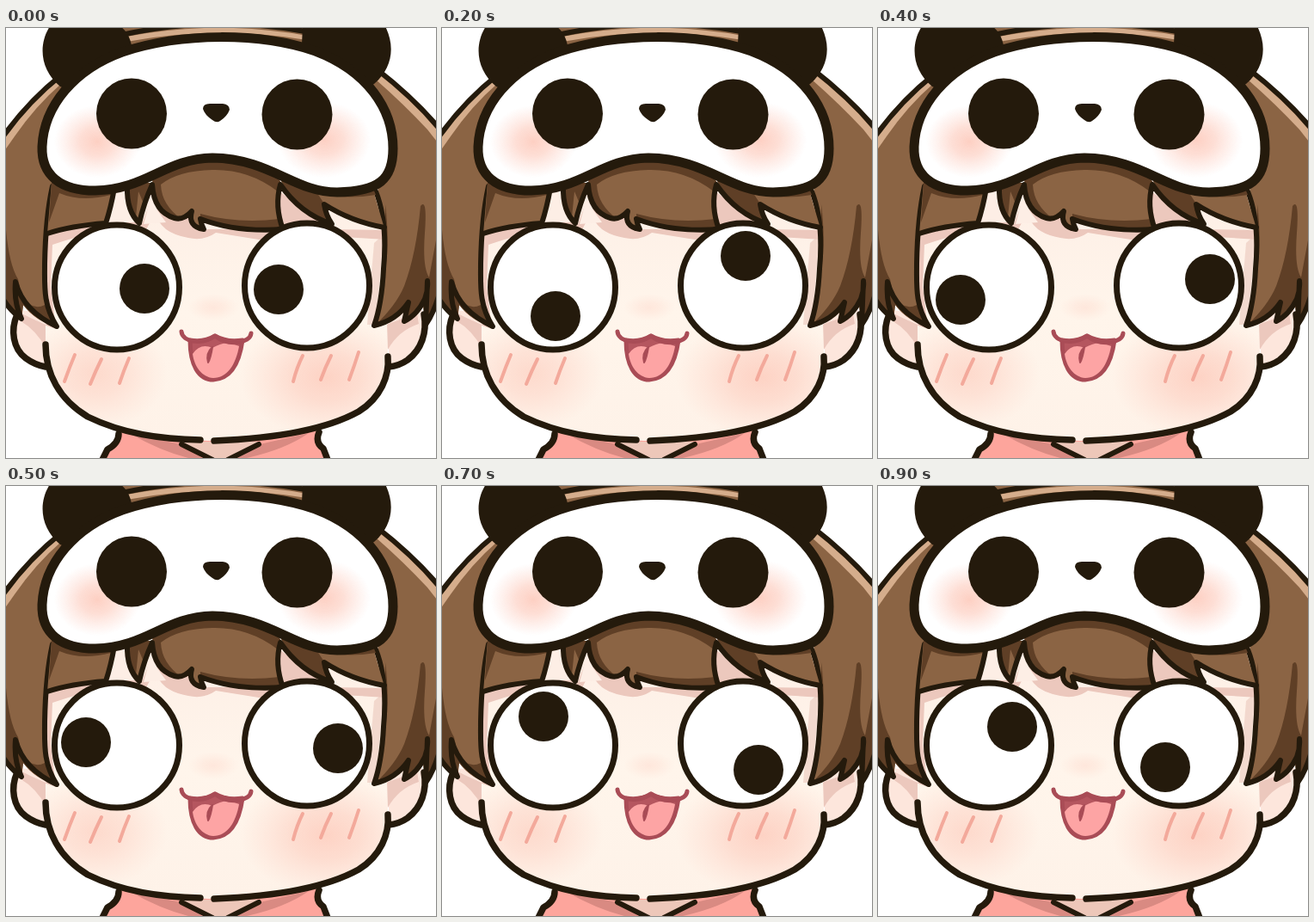
An HTML page for the animation above (1 s loop, 500x500 px).

```html
<!DOCTYPE html>
<html lang="en">
<head>
<meta charset="utf-8">
<title>Rolling eyes</title>
<style>
  html, body { margin: 0; width: 100%; height: 100%; overflow: hidden; background: #fff; }
  svg { display: block; width: 100vw; height: 100vh; }
  .ink { fill: none; stroke: #241a0c; stroke-width: 6; stroke-linecap: round; stroke-linejoin: round; }
  .bold { stroke-width: 7.5; }
  .eye { fill: #fff; stroke: #241a0c; stroke-width: 7; }
  .dark { fill: #241a0c; }
  .hair { fill: #8b6444; }
  .shade { fill: #5f3f26; }
  .light { fill: #d5ad8c; }
  .skinShade { fill: #ecc8bd; }
  .white { fill: #fff; }
</style>
</head>
<body>
<svg viewBox="0 0 500 500">
  <defs>
    <radialGradient id="blush">
      <stop offset="0" stop-color="#fdc4b4"/>
      <stop offset=".4" stop-color="#fdc9ba" stop-opacity=".75"/>
      <stop offset="1" stop-color="#fdd0c3" stop-opacity="0"/>
    </radialGradient>
    <linearGradient id="skin" x2="0" y2="1">
      <stop offset="0" stop-color="#fdeee5"/>
      <stop offset=".5" stop-color="#fff5eb"/>
      <stop offset="1" stop-color="#fef2e8"/>
    </linearGradient>
    <path id="face" d="M48 180L46 366C46 402 62 432 95 452C136 472 180 478 235 480C318 477 374 466 410 446C436 430 446 404 444 375L438 180Z"/>
    <path id="mask" d="M42 138C44 90 80 48 135 28C205 5 295 5 360 27C420 50 450 94 450 140C450 176 434 190 385 191C335 191 308 152 240 151C185 152 163 188 104 189C63 189 41 171 42 138Z"/>
    <clipPath id="maskClip"><use href="#mask"/></clipPath>
    <clipPath id="faceClip"><use href="#face"/></clipPath>
  </defs>

  <!-- shirt -->
  <path fill="#fda59c" d="M112 502L121 486Q130 480 131 468L238 478L364 468Q361 480 370 488L374 502Z"/>
  <path fill="#d98a82" d="M145 472Q180 492 212 500H228L203 484ZM295 484L262 500H280Q325 490 352 471Z"/>
  <path fill="#edc7b9" d="M203 481H295L252 502H238Z"/>
  <path class="ink bold" d="M112 502L118 490Q131 483 131 472M374 502L369 489Q359 482 364 470"/>
  <path class="ink" d="M204 484L240 502M294 484L258 502"/>

  <!-- ears -->
  <path fill="#fde6dc" d="M12 328C3 355 10 386 46 395V330ZM484 328C494 355 484 388 445 395V330Z"/>
  <path class="skinShade" d="M14 330Q30 338 46 345V372Q36 352 16 340ZM478 332L436 347L444 374Q456 352 480 344Z"/>
  <path class="ink bold" d="M13 333C5 351 8 373 23 384Q34 392 46 394M486 333C490 354 483 374 467 386Q457 393 445 394"/>

  <!-- face -->
  <use href="#face" fill="url(#skin)"/>
  <g clip-path="url(#faceClip)">
    <ellipse cx="104" cy="402" rx="84" ry="64" fill="url(#blush)" opacity=".55"/>
    <ellipse cx="372" cy="406" rx="100" ry="70" fill="url(#blush)" opacity=".7"/>
    <ellipse cx="241" cy="325" rx="30" ry="16" fill="url(#blush)" opacity=".28"/>
    <path class="skinShade" d="M46 234L120 226L130 190L146 214L158 228L172 190L184 214L216 220L230 234L320 234L318 190L376 234L442 235V246L376 242L300 247L244 238Q230 248 212 244Q178 238 174 214L162 236Q130 226 54 252L52 300L58 350L44 345Z"/>
    <path class="skinShade" opacity=".6" d="M439 240L430 345L420 345L428 250Z"/>
    <path fill="#fdeee5" d="M128 186H140L142 212L152 226H120ZM160 228L170 190L176 212L186 226Z"/>
  </g>
  <path class="ink bold" d="M46 368C46 402 62 432 95 452C136 472 180 478 226 479M242 480C318 477 374 466 410 446C436 430 446 404 444 382"/>

  <!-- hair -->
  <path class="hair" d="M-4 127Q26 85 64 55L80 160L52 185L45 290Q47 320 59 347Q35 342 20 322L18 338Q6 330 -4 316ZM504 117Q475 82 430 47L400 160L432 185L441 240Q440 300 428 346Q451 342 466 322L463 341Q475 336 485 322L488 345L504 312Z"/>
  <path class="light" d="M-4 131Q26 88 64 58V65Q35 90 10 126L-4 146ZM504 122Q475 86 430 51V60Q462 88 490 118L504 136Z"/>
  <path class="shade" d="M-2 200Q0 270 14 292L18 310Q30 330 45 322L58 346Q34 340 20 322L18 338Q5 328 -3 316ZM429 346Q454 322 463 300Q477 263 482 207Q490 197 487 238Q484 278 492 290L502 236V310L488 345L485 323L463 341L466 322Q448 342 429 346ZM441 205Q448 262 437 300L441 235Z"/>
  <path class="ink" d="M-4 127Q26 85 64 55M430 47Q475 82 504 117M-3 316Q6 330 18 338Q9 320 11 295Q20 329 59 347C43 322 45 300 45 274Q46 220 54 184M430 190Q444 225 439 280Q437 321 428 346Q454 340 468 319L463 341Q478 334 487 315Q491 305 490 294L488 345Q497 332 503 312"/>

  <!-- fringe -->
  <path class="hair" d="M53 180H126Q122 206 116 226Q76 230 48 239ZM140 180H172Q161 203 156 227Q142 214 141 195ZM170 172L188 150H300L320 180Q313 207 322 234Q270 237 226 222L230 234Q213 231 213 220Q206 225 196 221Q172 212 170 174ZM320 178L425 182L440 233Q406 226 371 206L379 228Q340 216 320 178Z"/>
  <path class="shade" d="M53 180H126L122 194Q88 203 62 192L50 226ZM140 180H172L160 204L154 190L151 220L142 207ZM170 172L188 150H300L320 180L316 190Q282 164 240 165Q200 166 180 182Q181 206 204 222Q172 214 170 174ZM226 216Q270 228 318 222L322 234Q268 237 226 222ZM320 178L425 182L430 194Q394 200 362 192L371 206L379 228Q340 216 320 178Z"/>
  <path class="ink" d="M48 239Q75 230 116 227Q122 209 126 186M141 184Q140 213 155 227Q160 204 170 182Q172 214 196 221Q206 224 216 213Q211 231 230 234Q227 229 226 222Q268 238 322 234Q312 207 319 182Q342 216 379 228Q372 218 370 205Q401 225 440 232"/>

  <!-- crown and panda ears -->
  <path class="hair" d="M132 0H360V34H132Z"/>
  <path class="light" d="M140 10Q245 -10 350 9V14Q245 -4 140 16Z"/>
  <path class="ink" d="M134 8Q245 -16 354 5"/>
  <path class="dark" d="M51 -2C37 20 40 49 63 68L90 80L147 40Q149 10 133 -2ZM345 -2L343 40L400 80L428 65C449 47 453 22 441 -2Z"/>

  <!-- sleep mask -->
  <use href="#mask" class="white"/>
  <g clip-path="url(#maskClip)" fill="url(#blush)" opacity=".8">
    <ellipse cx="106" cy="132" rx="50" ry="42"/>
    <ellipse cx="370" cy="130" rx="54" ry="44"/>
  </g>
  <use href="#mask" class="ink" style="stroke-width:11"/>
  <g class="dark">
    <circle cx="146" cy="99.500" r="41"/>
    <circle cx="338.500" cy="100.500" r="41"/>
    <path d="M229 94Q229 88 237 88H252Q260 89 260 95Q257 103 249 108Q245 111 240 107Q231 101 229 94Z"/>
  </g>

  <!-- eyes -->
  <circle class="eye" cx="129" cy="301.500" r="72.500"/>
  <circle class="eye" cx="350" cy="299.500" r="72.500"/>
  <circle class="dark" id="left" r="29"/>
  <circle class="dark" id="right" r="29"/>

  <!-- mouth and cheek marks -->
  <g stroke="#a94c56" stroke-width="5" stroke-linecap="round" stroke-linejoin="round">
    <path fill="#b5565f" d="M214 363C214 392 224 409 241 409C260 408 271 392 275 363Q257 366 243 358Q230 366 214 363Z"/>
    <path fill="#fda4a4" stroke="none" d="M217 379Q226 366 240 372Q256 362 271 370C267 392 257 407 241 407C228 406 219 394 217 379Z"/>
    <path fill="none" d="M204 353C205 365 228 369 243 358C258 370 284 367 285 355"/>
    <path fill="#a94c56" stroke-width="2" d="M240 371Q232 378 235 389Q238 384 240 371Z"/>
  </g>
  <path fill="none" stroke="#f3a99b" stroke-width="4" stroke-linecap="round" d="M80 380Q74 394 68 411M111 385Q104 399 98 414M143 384Q137 398 132 413M345 381Q338 395 334 411M378 381Q371 395 366 409M410 377Q405 393 399 409"/>
</svg>
<script>
  // Pupil centres, one per 100 ms step
  const paths = {
    left: [[161,303], [155,324], [132,335], [110,331], [96,316], [93,298], [98,281], [118,268], [141,269], [156,280]],
    right: [[317,304], [325,275], [353,265], [376,273], [386,292], [386,305], [381,318], [368,330], [351,334], [334,327]]
  };
  const start = performance.now();

  function draw(now) {
    const step = Math.floor(Math.max(0, now - start) / 100) % 10;
    for (const id in paths) {
      const [x, y] = paths[id][step];
      document.getElementById(id).setAttribute("transform", `translate(${x} ${y})`);
    }
    requestAnimationFrame(draw);
  }
  draw(start);
</script>
</body>
</html>
```
